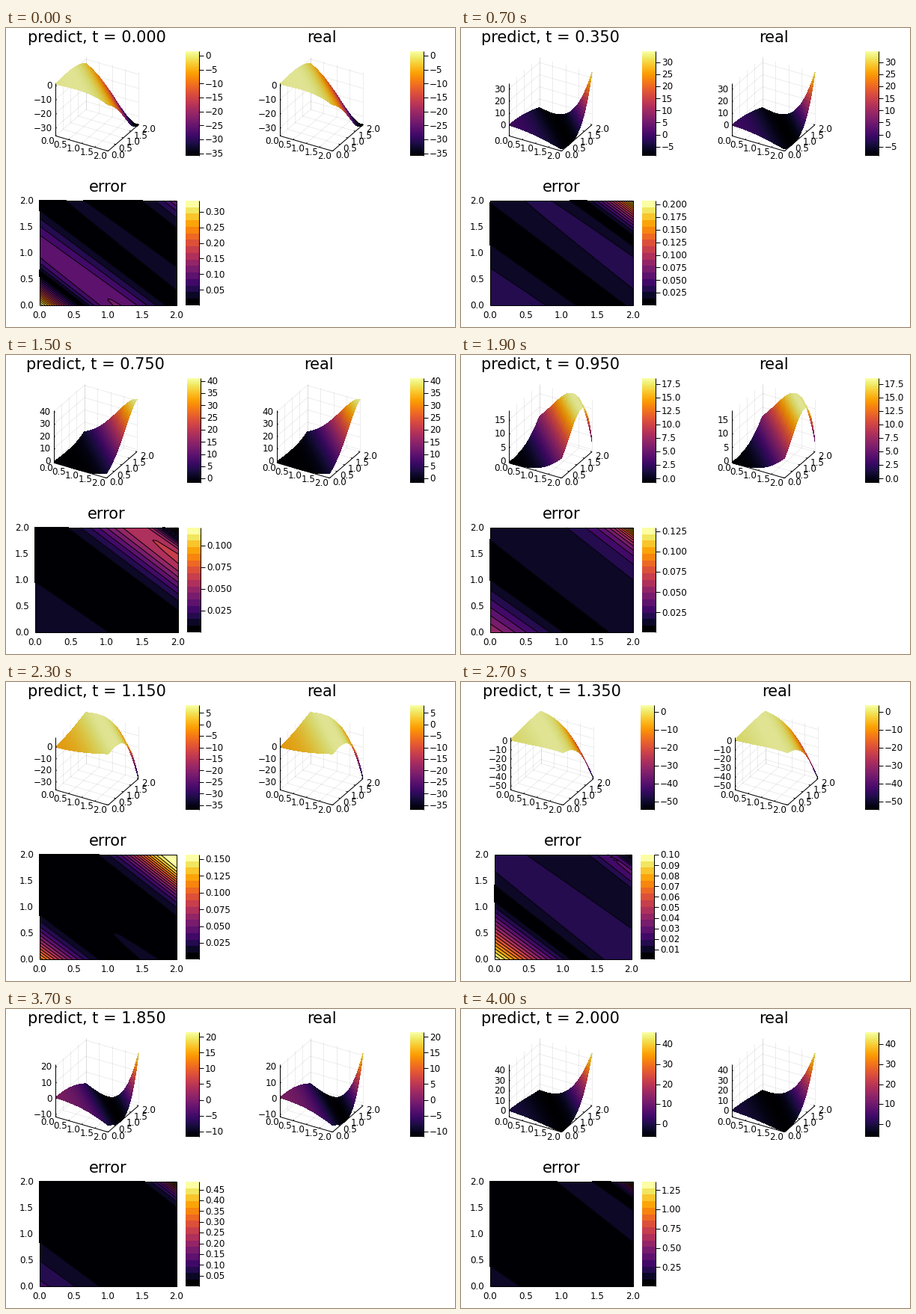
These frames come from a looping animation (600 px wide and 400 px high, 4.1 s). A matplotlib script:

```python
import math
import numpy as np
import matplotlib.pyplot as plt
from matplotlib.animation import FuncAnimation
from matplotlib.collections import LineCollection, PolyCollection
from matplotlib.patches import Rectangle

W, H, DPI = 600, 400, 100
PX = 72 / DPI
FRAMES, INTERVAL, DT = 41, 100, 0.05

plt.rcParams["font.family"] = "DejaVu Sans"
CMAP = plt.get_cmap("inferno")
BANDS = 16
BAND_COLORS = CMAP(np.linspace(0, 1, BANDS))

GRID = np.linspace(0, 2, 41)
X, Y = np.meshgrid(GRID, GRID)
S = X + Y
UNIT = 81.3            # projected edge length of the 3D box
SHADE = 0.89           # surface is a little darker than the colour scale

# key points of the error: wave decay, far-corner spike, bump around that corner
KEY_TIMES = [0, 0.35, 0.75, 1.15, 1.55, 1.85, 2]
DECAY = [1, 0, 0, 1.4, 0.2, 0.6, 0.6]
SPIKE = [-0.11, 0.14, -0.24, 0.03, 0.266, 0.486, 1.55]
BUMP = [0, 0.09, 0.13, -0.18, 0, 0, -0.19]

fig = plt.figure(figsize=(W / DPI, H / DPI), dpi=DPI, facecolor="white")
ax = fig.add_axes([0, 0, 1, 1])


def solution(t):
    return np.exp(S) * np.cos(S + 4 * t)


def error(t):
    """Damped wave from the near corner plus a spike and a bump at the far one."""
    decay, spike, bump = (np.interp(t, KEY_TIMES, k) for k in (DECAY, SPIKE, BUMP))
    start = np.exp(-8 * t)
    rise = np.clip((t - 0.75) / 0.4, 0, 1)
    amp = (0.33 * np.exp(-7.5 * t) + 0.012
           + rise * (0.083 + 0.03 * np.cos(7 * (t - 1.15))))
    freq = 0.95 + 0.4 * decay + 0.9 * start
    wave = amp * np.exp(-decay * S) * np.cos(freq * S + 0.2 * start)

    q = 4 - S
    width = 0.8 + 0.3 * np.cos(5 * (t - 0.75))
    corner = spike * np.exp(-q / (0.3 - 0.06 * t)) + bump * np.exp(-(q / width) ** 2)
    return np.abs((wave + corner) * (1 + 0.04 * (X - Y)))


def ticks(lo, hi, step):
    return step * np.arange(math.ceil(lo / step), math.floor(hi / step) + 1)


def bar_step(span):
    power = 10.0 ** math.floor(math.log10(span))
    ratio = span / power
    return power * (1 if ratio > 5 else 0.5 if ratio > 2.5 else 0.25)


def height_ticks(lo, hi):
    vals = ticks(lo, hi, 10)
    return vals if len(vals) >= 4 else ticks(lo, hi, 5)


def decimals(step):
    return next(d for d in range(6) if abs(step * 10**d - round(step * 10**d)) < 1e-6)


def number(v, digits):
    return f"{v + 0.0:.{digits}f}".replace("-", "−")


def label(x, y, text, ha):
    """Tick label whose digits are centred on y."""
    ax.text(x, y + 4.3, text, ha=ha, va="baseline", fontsize=11.9 * PX)


def title(x, y, text):
    ax.text(x, y, text, ha="center", va="baseline", fontsize=20.9 * PX)


def lines(segments, color="black", width=1.0, z=5, snap=None):
    ax.add_collection(LineCollection(segments, colors=[color], snap=snap,
                                     linewidths=width * PX, zorder=z))


def colorbar(x, top, lo, hi, colors):
    bottom = top + 140
    ax.imshow(colors[::-1, None, :], extent=(x, x + 18, bottom, top),
              aspect="auto", interpolation="nearest", zorder=2)
    step = bar_step(hi - lo)
    right = x + 18
    segs = [[(right, top), (right, bottom)]]
    for v in ticks(lo, hi, step):
        y = bottom - 140 * (v - lo) / (hi - lo)
        segs.append([(right, y), (right + 6, y)])
        label(right + 8, y, number(v, decimals(step)), "left")
    lines(segs, snap=True)


def surface_plot(left, z):
    lo, hi = z.min(), z.max()

    def project(x, y, v):
        a, b, c = x / 2, y / 2, (v - lo) / (hi - lo)
        return np.stack([left + UNIT * (0.866 * a + 0.5 * b),
                         144.3 + UNIT * (0.25 * a - 0.433 * b - 0.866 * c)], axis=-1)

    def seg(*points):
        return [project(*map(np.asarray, p)) for p in points]

    # faint grid on the floor and the two back walls
    grid = []
    for g in np.arange(0, 2.1, 0.5):
        grid += [seg((g, 0, lo), (g, 2, lo)), seg((g, 2, lo), (g, 2, hi)),
                 seg((0, g, lo), (2, g, lo)), seg((0, g, lo), (0, g, hi))]
    marks = height_ticks(lo, hi)
    for v in marks:
        grid += [seg((0, 0, v), (0, 2, v)), seg((0, 2, v), (2, 2, v))]
    lines(grid, (0, 0, 0, 0.1), 0.7, 1)

    # quads from back to front
    p = project(X, Y, z)[::-1]
    zz = z[::-1]
    quads = np.stack([p[:-1, :-1], p[:-1, 1:], p[1:, 1:], p[1:, :-1]], axis=2)
    mean = (zz[:-1, :-1] + zz[:-1, 1:] + zz[1:, 1:] + zz[1:, :-1]) / 4
    colors = CMAP((mean.ravel() - lo) / (hi - lo))
    colors[:, :3] *= SHADE
    ax.add_collection(PolyCollection(quads.reshape(-1, 4, 2), facecolors=colors,
                                     edgecolors="none", antialiaseds=False, zorder=3))

    axes = [seg((0, 0, lo), (0, 0, hi)), seg((0, 0, lo), (2, 0, lo)),
            seg((2, 0, lo), (2, 2, lo))]
    for g in np.arange(0, 2.1, 0.5):
        axes += [seg((g, 0, lo), (g, 0.06, lo)), seg((2, g, lo), (1.94, g, lo))]
        x, y = project(g, 0, lo)
        label(x - 1.2, y + 6.5, f"{g:.1f}", "right")
        x, y = project(2, g, lo)
        label(x + 4, y + 5, f"{g:.1f}", "left")
    for v in marks:
        axes.append(seg((0, 0, v), (0.05, 0, v)))
        x, y = project(0, 0, v)
        label(x - 4.5, y, number(v, 0), "right")
    lines(axes, z=4)


def error_plot(left, right, err):
    top, bottom = 231, 371
    px = left + X / 2 * (right - left)
    py = bottom - Y / 2 * (bottom - top)
    levels = np.linspace(err.min(), err.max() * 1.00001, BANDS + 1)
    fill = ax.contourf(px, py, err, levels=levels, colors=BAND_COLORS, zorder=2)
    # only the lowest band carries an outline of its own
    fill.set(edgecolor=["black"] + ["none"] * (BANDS - 1), linewidth=1.5 * PX)
    ax.contour(px, py, err, levels=levels[1:-1], colors="black",
               linewidths=PX, zorder=3)
    ax.add_patch(Rectangle((left, top), right - left, bottom - top, fill=False,
                           linewidth=PX, edgecolor="black", zorder=4))
    for g in np.arange(0, 2.1, 0.5):
        label(left + g / 2 * (right - left), 383.5, f"{g:.1f}", "center")
        label(left - 8, bottom - g * 70, f"{g:.1f}", "right")


def draw(i):
    t = i * DT
    z, err = solution(t), error(t)
    lo, hi = z.min(), z.max()

    ax.clear()
    ax.set_xlim(0, W)
    ax.set_ylim(H, 0)
    ax.axis("off")

    # two-digit negative height labels need a wider margin
    wide = lo < -10
    box1, box2 = (66, 366) if wide else (64, 362)
    left, right = (45, 228) if wide else (39, 230)
    bar = 240 if wide else 242

    ramp = CMAP(np.linspace(0, 1, 256))
    for box, bar_x, text in ((box1, bar, f"predict, t = {t:.3f}"), (box2, 540, "real")):
        title(box + 55.5, 19, text)
        surface_plot(box, z)
        colorbar(bar_x, 31, lo, hi, ramp)

    title((left + right) / 2, 219, "error")
    error_plot(left, right, err)
    colorbar(bar, 231, max(err.min(), 1e-6), err.max(), BAND_COLORS)
    return []


anim = FuncAnimation(fig, draw, frames=FRAMES, init_func=lambda: [],
                     interval=INTERVAL, repeat=True, repeat_delay=0, blit=False)
plt.show()
```
